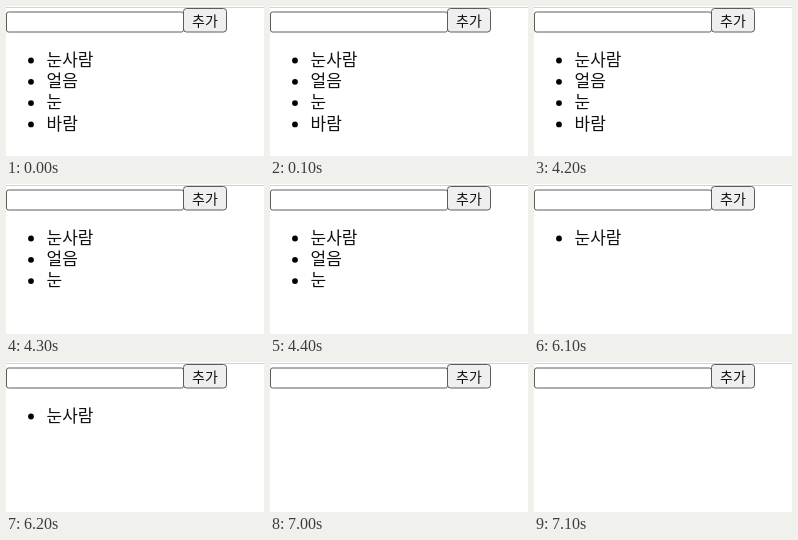
An HTML page with a canvas for the animation above (9 s loop, 258x150 px).

```html
<!DOCTYPE html>
<html lang="ko">
<head>
<meta charset="utf-8">
<title>목록</title>
<style>
  html, body { margin: 0; width: 100%; height: 100%; overflow: hidden; background: #fff; }
  canvas { display: block; width: 258px; height: 150px; }
</style>
</head>
<body>
<canvas id="stage"></canvas>
<script>
const W = 258, H = 150, LOOP = 9000;
const FONT = '"Noto Sans CJK KR", "Noto Sans CJK", sans-serif';
// each item stays until its removal time, in ms
const items = [
  { text: '눈사람', until: 7000 },
  { text: '얼음', until: 6100 },
  { text: '눈', until: 5300 },
  { text: '바람', until: 4300 }
];

const canvas = document.getElementById('stage');
const ctx = canvas.getContext('2d');
const scale = window.devicePixelRatio || 1;
canvas.width = W * scale;
canvas.height = H * scale;
ctx.scale(scale, scale);

function box(x, y, w, h, r, fill, stroke) {
  ctx.beginPath();
  ctx.roundRect(x + 0.5, y + 0.5, w - 1, h - 1, r);
  ctx.fillStyle = fill;
  ctx.fill();
  ctx.strokeStyle = stroke;
  ctx.lineWidth = 1;
  ctx.stroke();
}

function label(text, x, y, size) {
  ctx.font = `350 ${size}px ${FONT}`;
  ctx.fillStyle = '#111';
  ctx.fillText(text, x, y);
}

function drawForm() {
  ctx.fillStyle = '#d2d2d2';
  ctx.fillRect(0, 1, W, 1);
  box(0, 5.5, 178, 21, 2, '#fff', '#5c5c5c');
  box(177, 2, 44, 24.5, 3, '#efefef', '#5c5c5c');
  label('추가', 186, 20, 14);
}

function drawItem(text, row) {
  const y = 59.7 + row * 21.3;
  ctx.beginPath();
  ctx.arc(25, y - 5.2, 2.9, 0, Math.PI * 2);
  ctx.fillStyle = '#000';
  ctx.fill();
  label(text, 40.5, y, 17);
}

function draw(t) {
  ctx.fillStyle = '#fff';
  ctx.fillRect(0, 0, W, H);
  drawForm();
  items.forEach((item, row) => {
    if (t < item.until) drawItem(item.text, row);
  });
}

const start = performance.now();
function tick() {
  draw((performance.now() - start) % LOOP);
  requestAnimationFrame(tick);
}
tick();
</script>
</body>
</html>
```
